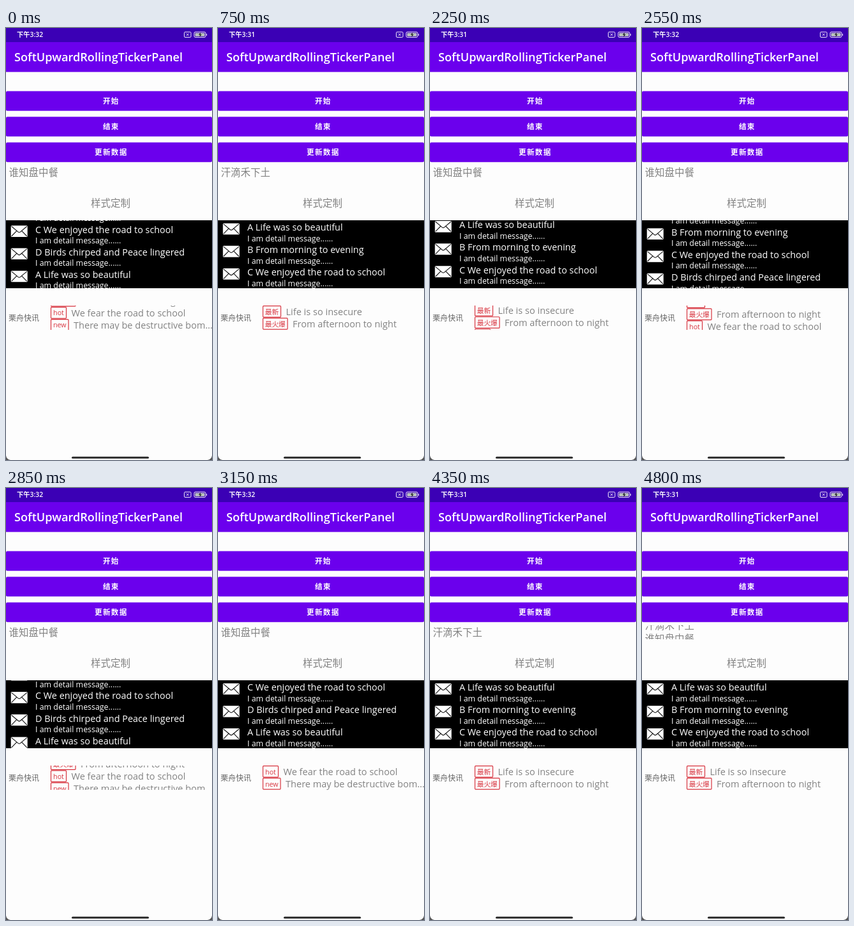
These frames come from a looping animation (323x674 px, 4900 ms). An HTML page:

```html
<!DOCTYPE html>
<html lang="zh-CN">
<head>
<meta charset="utf-8">
<title>Ticker</title>
<style>
  html, body { margin: 0; width: 100%; height: 100%; overflow: hidden; background: #fdfdfd; }
  svg { display: block; width: 100%; height: 100%; }
  text { font-family: "Open Sans", "Noto Sans CJK SC", "Noto Sans CJK", sans-serif; white-space: pre; }
  .mid { text-anchor: middle; }
  .brand { fill: #6b00ed; }
  .bar { fill: #fff; font-weight: 600; }
  .btn { fill: #fff; font-size: 11.6px; font-weight: 700; letter-spacing: 1.3px; }
  .grey { fill: #828282; font-size: 15.5px; }
  .head { fill: #fff; font-size: 14.4px; }
  .detail { fill: #fff; font-size: 12.4px; }
  .news { fill: #828282; font-size: 14.55px; }
  .tag { fill: #d8343f; font-size: 10.7px; font-weight: 500; }
  .box { fill: none; stroke: #d8343f; stroke-width: 1.2; }
</style>
</head>
<body>
<svg viewBox="0 0 323 674" preserveAspectRatio="none">
  <defs>
    <clipPath id="poemClip"><rect y="214" width="323" height="22"/></clipPath>
    <clipPath id="listClip"><rect y="300" width="323" height="106"/></clipPath>
    <clipPath id="newsClip"><rect y="433" width="323" height="38"/></clipPath>
    <g id="mail">
      <rect width="26" height="17.6" rx="1.5" fill="#fff"/>
      <path d="M1 1.2L11.5 10Q13 11.2 14.5 10L25 1.2M1 16.4L9 8.2M25 16.4L17 8.2" fill="none" stroke="#111" stroke-width="1.1"/>
    </g>
  </defs>

  <rect width="323" height="674" fill="#fdfdfd"/>
  <rect class="brand" width="323" height="68.6"/>
  <rect width="323" height="22" fill="#3b00b5"/>
  <text id="clock" class="bar" x="17" y="14.2" font-size="10.3"></text>
  <g fill="none" stroke="#fff" stroke-width=".9">
    <rect x="279.5" y="6.2" width="10.5" height="8.3" rx="1.5"/>
    <path d="M283 8.6l3.5 3.5m0-3.5l-3.5 3.5"/>
    <rect x="295" y="6.2" width="18" height="8.3" rx="2"/>
    <path d="M314.6 9v3"/>
  </g>
  <rect x="296.5" y="7.7" width="15" height="5.3" rx="1" fill="#b9c3bd"/>
  <path d="M305.5 6.6l-3.6 4.2h2.2l-.8 3.4 3.6-4.3h-2.2z" fill="#222"/>
  <text class="bar" x="13" y="52" font-size="18.15">SoftUpwardRollingTickerPanel</text>

  <g id="buttons"></g>
  <g clip-path="url(#poemClip)"><g id="poem"></g></g>
  <text class="grey mid" x="164" y="279">样式定制</text>
  <rect y="300" width="323" height="106" fill="#000"/>
  <g clip-path="url(#listClip)"><g id="list"></g></g>
  <text x="4" y="456.8" font-size="12" fill="#666">栗舟快讯</text>
  <g clip-path="url(#newsClip)"><g id="news"></g></g>

  <rect x="103" y="668.7" width="121" height="3" rx="1.5" fill="#2a2a2a"/>
  <path d="M0 667Q1 673 7 674H0ZM323 667Q322 673 316 674H323Z" fill="#555"/>
</svg>
<script>
const LOOP = 4900, TICK = 150, ROLL = 1060;
const POEM_START = 1141, LIST_START = 2095, MINUTE = 2550;
const POEM_ROW = 21.5, LIST_ROW = 35.15, NEWS_ROW = 19;

const $ = id => document.getElementById(id);

function add(parent, name, attrs, content) {
  const el = document.createElementNS(parent.namespaceURI, name);
  for (const key in attrs) el.setAttribute(key, attrs[key]);
  if (content) el.textContent = content;
  parent.appendChild(el);
}

const label = (parent, cls, x, y, content) =>
  add(parent, 'text', { class: cls, x, y }, content);

['开始', '结束', '更新数据'].forEach((name, i) => {
  const y = 98.6 + 40 * i;
  add($('buttons'), 'rect', { class: 'brand', y, width: 323, height: 30.6, rx: 2 });
  label($('buttons'), 'btn mid', 164.8, y + 19.8, name);
});

['汗滴禾下土', '谁知盘中餐'].forEach((line, i) =>
  label($('poem'), 'grey', 4.5, 231.4 + POEM_ROW * i, line));

[
  'A Life was so beautiful',
  'B From morning to evening',
  'C We enjoyed the road to school',
  'D Birds chirped and Peace lingered',
  'A Life was so beautiful'
].forEach((line, i) => {
  const y = 301 + LIST_ROW * i;
  add($('list'), 'use', { href: '#mail', x: 7.7, y: y + 3.7 });
  label($('list'), 'head', 46, y + 15, line);
  label($('list'), 'detail', 46, y + 31.5, 'I am detail message......');
});

[
  ['最新', 28, 'Life is so insecure'],
  ['最火爆', 38.5, 'From afternoon to night'],
  ['hot', 24, 'We fear the road to school'],
  ['new', 27.5, 'There may be destructive bom…']
].forEach(([tag, width, line], i) => {
  const y = 433.7 + NEWS_ROW * i;
  add($('news'), 'rect', { class: 'box', x: 70.5, y, width, height: 17.4, rx: 1 });
  label($('news'), 'tag mid', 70.5 + width / 2, y + 12.8, tag);
  label($('news'), 'news', 78.5 + width, y + 14.3, line);
});

// Accelerate, then decelerate
const ease = x => (1 - Math.cos(Math.PI * Math.min(1, Math.max(0, x)))) / 2;

// The sequence restarts with a hard cut at 750 and 3750 ms
const sceneTime = t => t < 750 ? t + 3000 : t < 3750 ? t : t - 3108;

const shift = (id, dy) => $(id).setAttribute('transform', `translate(0 ${-dy})`);

function draw() {
  const now = performance.now() % LOOP;
  const t = sceneTime(Math.floor(now / TICK) * TICK);
  const roll = ease((t - LIST_START) / ROLL);
  shift('poem', POEM_ROW * ease((t - POEM_START) / ROLL));
  shift('list', 2 * LIST_ROW * roll);
  shift('news', 2 * NEWS_ROW * roll);
  $('clock').textContent = t < MINUTE ? '下午3:31' : '下午3:32';
  requestAnimationFrame(draw);
}
draw();
</script>
</body>
</html>
```
